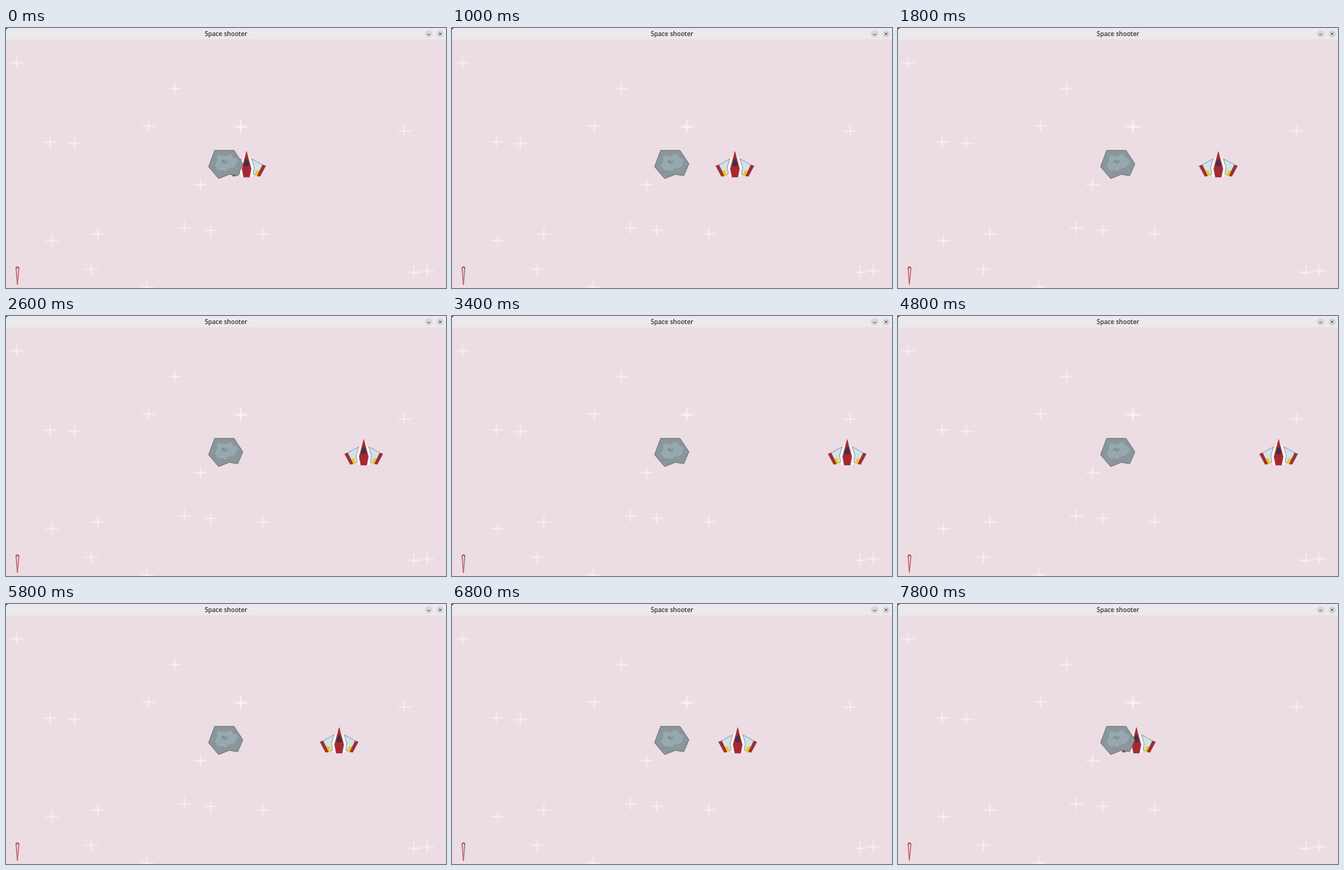
An HTML page that plays this animation: 600 by 354 pixels, repeating every 8000 ms.

```html
<!DOCTYPE html>
<html lang="en">
<head>
<meta charset="utf-8">
<title>Space shooter</title>
<style>
  html, body { margin: 0; width: 100%; height: 100%; overflow: hidden; background: #ecdde4; }
  svg { display: block; width: 100%; height: 100%; }
  text { font: 600 8.5px "Open Sans", "Noto Sans", sans-serif; fill: #333; }
</style>
</head>
<body>
<svg viewBox="0 0 600 354">
  <defs>
    <marker id="star" markerUnits="userSpaceOnUse" markerWidth="24" markerHeight="24" overflow="visible">
      <g stroke="#fff" fill="none">
        <path d="M-10 .3H11M.3 -9V9" stroke-width="2.2" opacity=".22"/>
        <path d="M-7 .3H8M.3 -7V7" stroke-width="1.3" opacity=".38"/>
        <path d="M-4 1.6H5" opacity=".25"/>
      </g>
    </marker>
    <g id="wing">
      <path d="M1 171L6 179L10 183L10.5 198L7 203H3Z" fill="#f7f5f7"/>
      <path d="M7 178.2L22 186.3L15.5 201L9 199L10.5 190Z" fill="#d3e2e8" stroke="#6d808b" stroke-width=".7"/>
      <path d="M12.5 194.5L17.5 193.5L18 195L15.5 201.3H12Z" fill="#f5c518"/>
      <path d="M22 186.5L26 187.8L18.3 202L14.8 201.2Z" fill="#a82a33" stroke="#66252d" stroke-width=".5"/>
    </g>
  </defs>

  <rect width="600" height="354" fill="#ecdde4"/>
  <path fill="none" marker-start="url(#star)" marker-mid="url(#star)" marker-end="url(#star)"
    d="M14 47L230 82L194 133L320 133L320 135L543 140L93 157L60 155L265 213L243 272L279 275L350 280L125 280L62 289L116 328L192 352L556 332L574 330"/>

  <path d="M15.5 349.5L13.8 328Q13.4 325.2 15.6 325.2Q17.9 325.2 17.5 328Z" fill="#ecd0d4" stroke="#b5484e" stroke-linejoin="round"/>
  <path d="M13.8 328Q13.6 325.2 15.6 325.2Q17.7 325.2 17.5 328" fill="none" stroke="#7c3238"/>

  <g id="ship">
    <use href="#wing"/>
    <use href="#wing" transform="scale(-1 1)"/>
    <path d="M0 168.3L3.4 181L6.2 191.5L4 203H-4L-6.2 191.5L-3.4 181Z" fill="#ab272e" stroke="#7a222b" stroke-width=".5"/>
    <path d="M0 178L2.6 182L4 187L0 189L-4 187L-2.6 182Z" fill="#453048"/>
  </g>

  <g stroke-linejoin="round">
    <path d="M284.5 166.7H311L323 185L316 201L304.5 199.3L290 205L276.3 189Z" fill="#8a979a" stroke="#626c6e" stroke-width=".9"/>
    <path d="M288 173L299 174.5L306 171.5L310 176L316 179L314.5 185L311 190L304 191L300 194.5L289 193.5L285 187L288 181Z" fill="#98a8b0"/>
    <path d="M293 181.5L297 179L299 181L296 184.5ZM298 182.5L302 179.5L301.5 183L297.5 186Z" fill="#819097"/>
  </g>

  <rect width="600" height="16" fill="#ebe9eb"/>
  <path d="M0 16.3H600" stroke="#dcd6da" stroke-width=".7"/>
  <path d="M0 0H2.5Q.5 .5 0 2.5Z" fill="#222"/>
  <text x="300" y="10.9" text-anchor="middle">Space shooter</text>
  <g fill="#d8d6d8"><circle cx="576.3" cy="8" r="5"/><circle cx="592" cy="8" r="5"/></g>
  <path d="M574.3 9H578.3M590.3 6.3L593.7 9.7M593.7 6.3L590.3 9.7" stroke="#444" stroke-width=".9"/>
</svg>
<script>
  const LOOP = 8000, STEP = 200;
  const LEFT = 325, RIGHT = 574, TURN = 3950;   // bounce points and the time at the right edge
  const SPEED_OUT = 0.0638, SPEED_BACK = 0.0647; // px per ms
  const ship = document.getElementById("ship");

  // Constant speed, reflected at the window edge and at the asteroid.
  function shipX(t) {
    const speed = t < TURN ? SPEED_OUT : SPEED_BACK;
    const x = RIGHT - speed * Math.abs(t - TURN);
    return LEFT + Math.abs(x - LEFT);
  }

  const start = performance.now();
  function draw(now) {
    const t = Math.max(0, now - start) % LOOP;
    ship.setAttribute("transform", `translate(${shipX(Math.floor(t / STEP) * STEP)} 0)`);
    requestAnimationFrame(draw);
  }
  draw(start);
</script>
</body>
</html>
```
